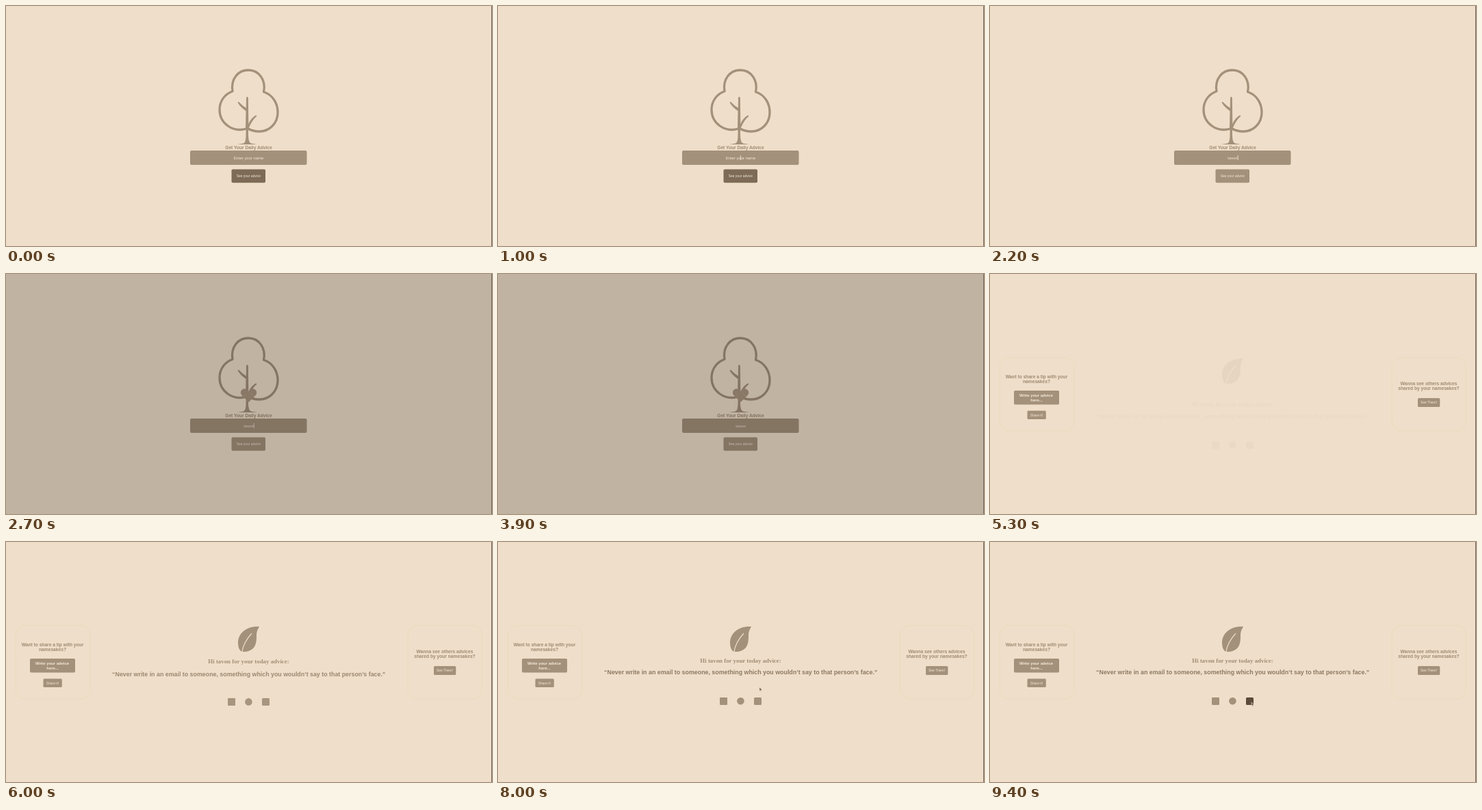
An HTML page for the animation above (9.9 s loop, 710x352 px).

```html
<!DOCTYPE html>
<html lang="en">
<head>
<meta charset="utf-8">
<title>Daily advice</title>
<style>
  html, body { margin: 0; width: 100%; height: 100%; overflow: hidden; background: #efdec9; }
  svg { display: block; width: 710px; height: 352px; }
  text { font: 5.92px "Liberation Sans", Arial, sans-serif; text-anchor: middle; fill: #f4e8d8; }
  .label { font-size: 4.93px; }
  .strong { font-weight: bold; }
  .title { font-weight: bold; font-size: 6.65px; fill: #a08b74; }
  .greeting { font: bold 8.86px "Liberation Serif", Times, serif; fill: #a28d76; }
  .quote { font-weight: bold; font-size: 8.86px; fill: #8d7963; }
  .brown { fill: #a4917b; }
  .card { fill: none; stroke: #ebd8ba; stroke-width: .8; }
</style>
</head>
<body>
<svg viewBox="0 0 710 352">
  <rect width="710" height="352" fill="#efdec9"/>

  <g id="home">
    <path fill="none" stroke="#a4917b" stroke-width="3.3" stroke-linejoin="round"
      d="M351 180C331 186 312 172 312 152C312 139 320 129 331 125C328 107 339 94 354 94C370 94 380 109 376.500 126C389 130 397 142 397 156C397 172 385 184 370 184C362 184 357 182 352 179"/>
    <path class="brown" d="M351 134.500Q352.300 131.500 353.800 134.500L354.300 173Q358 164 365 160.300L366.500 161.500Q360 167 355.500 177Q353.500 181 354 190Q354 200 358 201.500L367 203H338L347 201.500Q350.500 200 350.500 190Q351 184 350 179L350.500 154Q342 148 338.500 141.500L340 140.500Q345 146 350.800 149.500Z"/>
    <text class="title" x="354.500" y="210.400">Get Your Daily Advice</text>
    <rect class="brown" x="269" y="212" width="170.500" height="21" rx="2"/>
    <text id="name" x="354.500" y="224.500"></text>
    <rect id="caret" y="219" width=".8" height="7" fill="#f4e8d8"/>
    <rect id="submit" x="329.500" y="239.500" width="49.500" height="19.800" rx="1.800"/>
    <text class="label" x="354.300" y="251.400">See your advice</text>
  </g>

  <g id="loader">
    <rect width="710" height="352" fill="#000" opacity=".195"/>
    <g id="heart" fill="#8a7866">
      <g transform="translate(0 4.200) rotate(45) scale(.37)">
        <rect x="-16" y="-16" width="32" height="32"/>
        <path d="M-16-16H-24A16 16 0 0 0-24 16H-16ZM-16-16V-24A16 16 0 0 1 16-24V-16Z"/>
      </g>
    </g>
  </g>

  <g id="advice">
    <rect class="card" x="14" y="122.500" width="109" height="107.500" rx="14"/>
    <text class="title" x="68" y="152.800">Want to share a tip with your</text>
    <text class="title" x="68" y="160.400">namesakes?</text>
    <rect class="brown" x="35" y="171" width="66" height="20.500" rx="1.800"/>
    <text class="strong" x="67.500" y="180.200">Write your advice</text>
    <text class="strong" x="68" y="186.800">here...</text>
    <rect class="brown" x="54.500" y="200.500" width="27.300" height="12.500" rx="1.500"/>
    <text class="label" x="68" y="208.500">Share it!</text>

    <rect class="card" x="587" y="122.500" width="108.500" height="107.500" rx="14"/>
    <text class="title" x="641" y="162.700">Wanna see others advices</text>
    <text class="title" x="641" y="170.400">shared by your namesakes?</text>
    <rect class="brown" x="625" y="182" width="32.300" height="13" rx="1.500"/>
    <text class="label" x="641" y="190.400">See Them!</text>

    <g id="leaf">
      <path class="brown" d="M370 124C351 123 339 134 339 148C339 154 340.500 158 343.500 160.500C349 161.500 356 161 361 156C366 151 366 143 366 137C366 131 368 128 370 124Z"/>
      <path fill="none" stroke="#efdec9" stroke-width="1.200" d="M344.800 161.500Q347 147 359 134"/>
    </g>
    <text id="greeting" class="greeting" x="354.500" y="177">Hi tavon for your today advice:</text>
    <text id="quote" class="quote" x="354.700" y="194">“Never write in an email to someone, something which you wouldn’t say to that person’s face.”</text>
    <g id="icons">
      <rect x="324" y="228" width="11" height="11" rx="1"/>
      <circle cx="354.400" cy="233.300" r="5.300"/>
      <rect x="374" y="228" width="11" height="11" rx="1.500"/>
    </g>
  </g>

  <path id="pointer" fill="#6a5846" stroke="#f4e8d8" stroke-width=".6" d="M0 0V5.500L1.300 4.400L2.300 6.300L3.100 5.900L2.300 4H4Z"/>
  <rect x="709" width="1" height="352" fill="#6b6258"/>
</svg>

<script>
const LOOP = 9900;
const el = id => document.getElementById(id);
const clamp = v => Math.max(0, Math.min(1, v));
const mix = (a, b, k) => a + (b - a) * k;
const show = (id, on) => el(id).setAttribute('display', on ? 'inline' : 'none');
const icons = [...el('icons').children];

function bezier(x1, y1, x2, y2) {
  const at = (a, b, u) => 3 * a * u * (1 - u) ** 2 + 3 * b * u * u * (1 - u) + u ** 3;
  return x => {
    let lo = 0, hi = 1;
    for (let i = 0; i < 24; i++) {
      const mid = (lo + hi) / 2;
      if (at(x1, x2, mid) < x) lo = mid; else hi = mid;
    }
    return at(y1, y2, lo);
  };
}
const ease = bezier(.25, .1, .25, 1);
const beatEase = bezier(.215, .61, .355, 1);

// Heartbeat stops: [phase, scale]
const BEAT = [[0, .95], [.05, 1.1], [.39, .85], [.45, 1], [.6, .95], [1, .9]];
function beat(phase) {
  const i = BEAT.findIndex(stop => stop[0] > phase);
  const [p, a] = BEAT[i - 1], [q, b] = BEAT[i];
  return mix(a, b, beatEase((phase - p) / (q - p)));
}

function rise(id, t, duration, distance = 18.5) {
  const k = ease(clamp((t - 5220) / duration));
  el(id).setAttribute('transform', `translate(0 ${distance * (1 - k)})`);
  el(id).setAttribute('opacity', k);
}

// Hover tour: [time, x, y]
const TOUR = [[8000, 382, 213], [8600, 328, 235], [8700, 328, 235], [9000, 358, 237], [9100, 358, 237], [9400, 382, 235]];
function pointerAt(t) {
  if (t >= 200 && t < 800) {
    const u = (t - 200) / 600, v = 1 - u;
    return [v * v * 530 + 2 * u * v * 440 + u * u * 375, v * v * 154 + 2 * u * v * 300 + u * u * 222];
  }
  if (t < 8000) return null;
  const i = TOUR.findIndex(stop => stop[0] > t);
  if (i < 0) return TOUR[TOUR.length - 1].slice(1);
  const [t0, x0, y0] = TOUR[i - 1], [t1, x1, y1] = TOUR[i];
  const k = (t - t0) / (t1 - t0);
  return [mix(x0, x1, k), mix(y0, y1, k)];
}

function drawHome(t) {
  const typed = 'tavon'.slice(0, t < 1800 ? 0 : t < 2000 ? 2 : t < 2200 ? 4 : 5);
  el('name').textContent = typed || 'Enter your name';
  const blink = t < 1800 ? t >= 1000 && t < 1600
    : t < 2250 || Math.floor((t - 2250) / 530) % 2 === 0;
  show('caret', blink);
  el('caret').setAttribute('x', typed ? 354.5 + el('name').getComputedTextLength() / 2 : 354);
  el('submit').setAttribute('fill', t < 2000 ? '#7d6b58' : '#a4917b');

  const loading = t >= 2700;
  show('loader', loading);
  if (loading) {
    const scale = beat((t - 2700) % 1200 / 1200);
    el('heart').setAttribute('transform', `translate(354.5 176) scale(${scale})`);
  }
}

function drawAdvice(t, pointer) {
  rise('leaf', t, 750, 0);
  rise('greeting', t, 1000);
  rise('quote', t, 1380);
  rise('icons', t, 1120);
  icons.forEach((icon, i) => {
    const hover = pointer && pointer[1] >= 228 && Math.abs(pointer[0] - (329.5 + i * 25)) < 6;
    icon.setAttribute('fill', hover ? '#5c4b3b' : '#a4917b');
  });
}

function draw(t) {
  const home = t < 5250;
  const pointer = pointerAt(t);
  show('home', home);
  show('advice', !home);
  if (home) drawHome(t);
  else {
    show('loader', false);
    drawAdvice(t, pointer);
  }
  show('pointer', pointer);
  if (pointer) el('pointer').setAttribute('transform', `translate(${pointer})`);
}

const start = performance.now();
function tick() {
  draw((performance.now() - start) % LOOP);
  requestAnimationFrame(tick);
}
tick();
</script>
</body>
</html>
```
